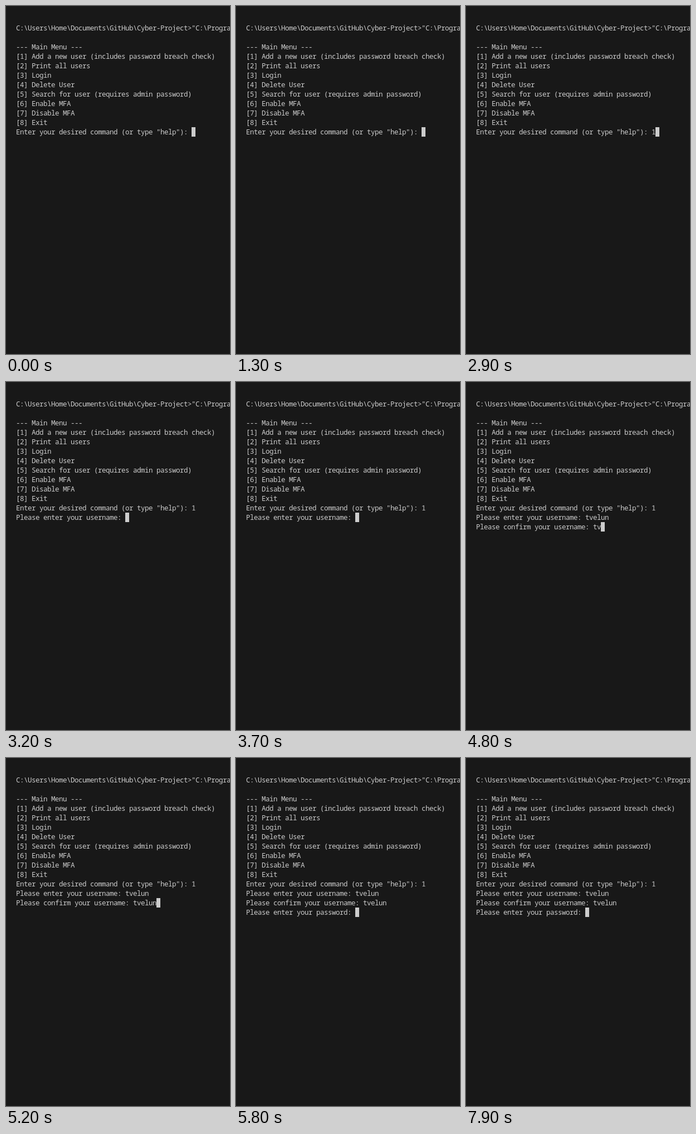
Write an HTML page that moves like this. It is 402 px wide and 626 px high and loops after 8000 ms.

```html
<!DOCTYPE html>
<html lang="en">
<head>
<meta charset="utf-8">
<title>Terminal menu</title>
<style>
  html, body { margin: 0; width: 100%; height: 100%; overflow: hidden; background: #181818; }
  pre {
    position: fixed; inset: 31px 0 0 18px; margin: 0; overflow: hidden;
    font: 500 12.5px/17px "Noto Sans Mono", "DejaVu Sans Mono", monospace;
    font-variant-ligatures: none;
    letter-spacing: calc(7px - 1ch); /* 7px terminal cells */
    color: #ccc;
  }
  #cursor { display: inline-block; width: 7px; height: 17px; vertical-align: top; background: #ccc; }
</style>
</head>
<body>
<pre><span id="screen"></span><span id="cursor"></span></pre>
<script>
const LOOP = 8000;
const KEY_DELAY = 100;
const USER = 'tvelun';

const menu = String.raw`C:\Users\Home\Documents\GitHub\Cyber-Project>"C:\Progra

--- Main Menu ---
[1] Add a new user (includes password breach check)
[2] Print all users
[3] Login
[4] Delete User
[5] Search for user (requires admin password)
[6] Enable MFA
[7] Disable MFA
[8] Exit
Enter your desired command (or type "help"): `;

// Prompts appear at once; typed text arrives one key at a time.
const session = [
  { at: 0, print: menu },
  { at: 1400, type: '1' },
  { at: 3000, print: '\nPlease enter your username: ' },
  { at: 3800, type: USER },
  { at: 4500, print: '\nPlease confirm your username: ' },
  { at: 4700, type: USER },
  { at: 5400, print: '\nPlease enter your password: ' }
];

const screen = document.getElementById('screen');

function textAt(time) {
  return session
    .filter(step => time >= step.at)
    .map(({ at, print, type }) =>
      print || type.slice(0, Math.floor((time - at) / KEY_DELAY) + 1))
    .join('');
}

const start = performance.now();

function draw() {
  const text = textAt((performance.now() - start) % LOOP);
  if (screen.textContent !== text) screen.textContent = text;
  requestAnimationFrame(draw);
}
draw();
</script>
</body>
</html>
```
